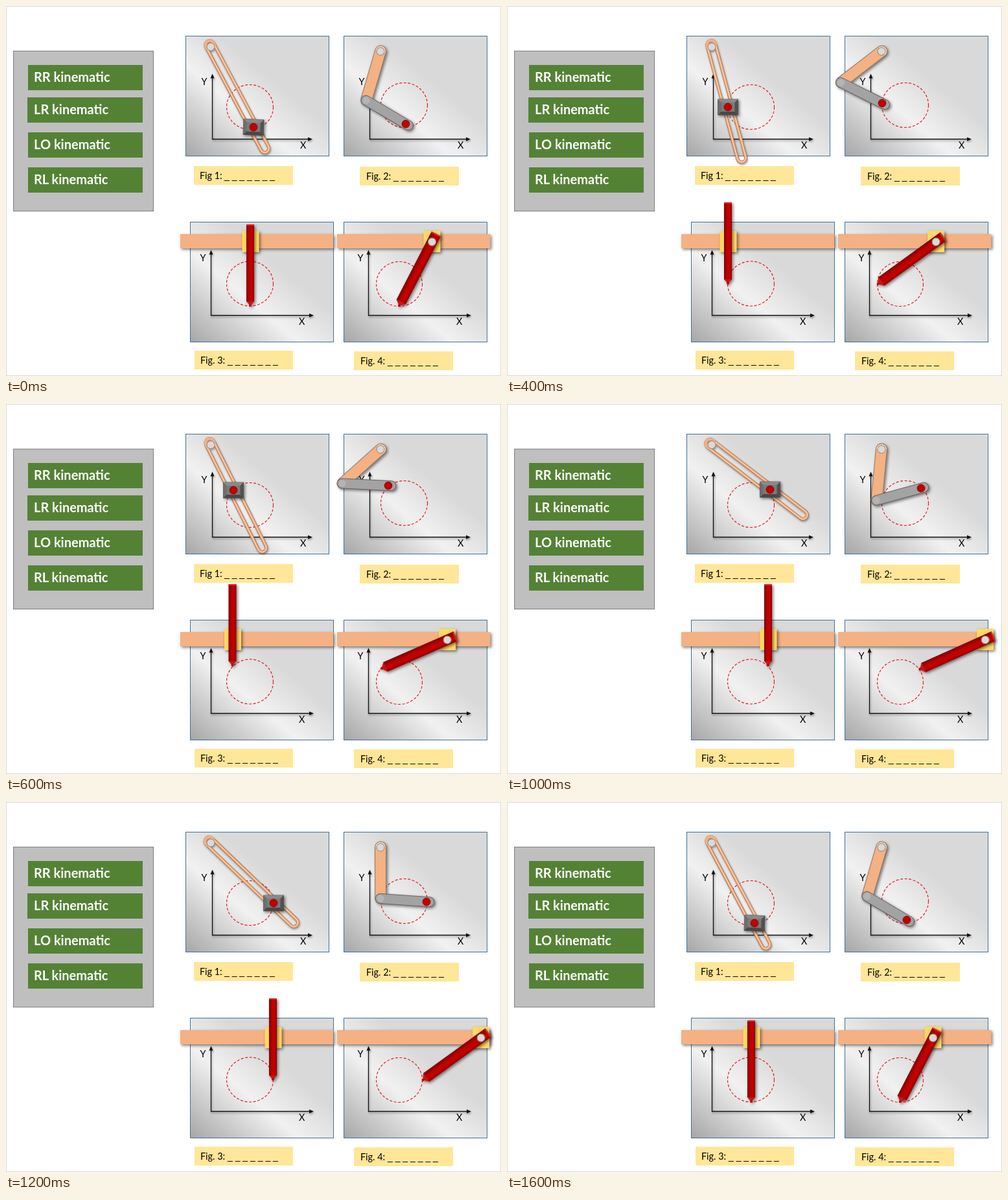
An HTML page for the animation above (1.8 s loop, 764 px wide and 571 px high).

```html
<!DOCTYPE html>
<html lang="en">
<head>
<meta charset="utf-8">
<title>Kinematics quiz</title>
<style>
  html, body { margin: 0; width: 100%; height: 100%; overflow: hidden; background: #fff; }
  svg { display: block; }
  text { font: 14.4px Lato, sans-serif; fill: #000; }
  .answer { font-weight: 700; font-size: 20px; fill: #fff; }
  .blank { font: 14px "Liberation Sans", sans-serif; }
  .axis { stroke: #111; stroke-width: 1.3; fill: none; }
  .orbit { fill: none; stroke: #e8141a; stroke-width: 1.15; stroke-dasharray: 4 2.6; }
  .soft { filter: drop-shadow(1px 2px 1.5px rgba(0, 0, 0, .35)); }
  .deep { filter: drop-shadow(2px 2px 2px rgba(0, 0, 0, .5)); }
</style>
</head>
<body>
<svg id="stage" width="764" height="571" viewBox="0 0 764 571">
  <defs>
    <linearGradient id="steel" x1="0" y1="1" x2="1" y2="0">
      <stop offset="0" stop-color="#a6a6a6"/>
      <stop offset=".38" stop-color="#f1f1f1"/>
      <stop offset=".62" stop-color="#d9d9d9"/>
    </linearGradient>
    <linearGradient id="red" x1="0" y1="0" x2="0" y2="1">
      <stop offset="0" stop-color="#8e0000"/>
      <stop offset=".3" stop-color="#c60000"/>
      <stop offset=".6" stop-color="#bd0000"/>
      <stop offset="1" stop-color="#7c0000"/>
    </linearGradient>
  </defs>
</svg>
<script>
const stage = document.getElementById('stage');

function add(parent, tag, attrs = {}, text) {
  const el = document.createElementNS('http://www.w3.org/2000/svg', tag);
  for (const k in attrs) el.setAttribute(k, attrs[k]);
  if (text) el.textContent = text;
  parent.appendChild(el);
  return el;
}
const group = (parent, cls) => add(parent, 'g', cls ? { class: cls } : {});
const rect = (parent, x, y, width, height, fill, more) =>
  add(parent, 'rect', { x, y, width, height, fill, ...more });
const disc = (parent, cx, cy, r, fill, more) =>
  add(parent, 'circle', { cx, cy, r, fill, ...more });
const shape = (parent, d, fill, more) => add(parent, 'path', { d, fill, ...more });
const label = (parent, x, y, text, cls = '') => add(parent, 'text', { x, y, class: cls }, text);

// Quiz answers
rect(stage, .5, .5, 763, 570, '#fff', { stroke: '#d9d9d9' });
rect(stage, 11.5, 69.5, 216, 247, '#bfbfbf', { stroke: '#7f7f7f' });
[['RR', 91, 34], ['LR', 141, 33], ['LO', 195, 34], ['RL', 249, 34]].forEach(([name, y, x]) => {
  rect(stage, x, y, 211 - x, 39, '#548235');
  label(stage, 43, y + 26, name + ' kinematic', 'answer');
});

// Panel with axes and the circular path
function panel(x, y, ox, oy, right, cx, cy, rx, ry) {
  rect(stage, x + .5, y + .5, 221, 185, 'url(#steel)', { stroke: '#41719c' });
  const g = group(stage, 'soft'), top = oy - 101;
  shape(g, `M${ox} ${top + 4}V${oy}H${right - 4}`, 'none', { class: 'axis' });
  shape(g, `M${ox} ${top}l3 7h-6zM${right} ${oy}l-7-3v6z`, '#111');
  label(stage, ox - 17, top + 17, 'Y');
  label(stage, ox + 135.5, oy + 14, 'X');
  add(stage, 'ellipse', { cx, cy, rx, ry, class: 'orbit' });
}

function caption(x, y, width, text, textX, blankX) {
  rect(stage, x, y, width, 29, '#ffe699');
  label(stage, textX, y + 20, text);
  label(stage, blankX, y + 20, '_ _ _ _ _ _ _', 'blank');
}

panel(277, 46, 318.5, 205.5, 473, 376.5, 156, 36, 34.5);
panel(521, 46, 561.5, 205.5, 717, 614.5, 153, 36, 34.5);
panel(284, 333, 316.5, 477.5, 475, 376.5, 428.5, 36, 34.5);
panel(521, 333, 559.5, 477.5, 718, 607, 429, 35.5, 34.5);
caption(290, 247, 153, 'Fig 1:', 299, 337);
caption(546, 248, 153, 'Fig. 2:', 556, 598);
caption(291, 532, 152, 'Fig. 3:', 300, 342);
caption(537, 533, 153, 'Fig. 4:', 547, 589);

const hole = (g, x) => disc(g, x, 0, 6, '#d9d9d9', { stroke: '#9b8a80', 'stroke-width': 1 });
const ball = g => disc(g, 0, 0, 6, '#c00000', { stroke: '#8a0000', 'stroke-width': .8 });

// Slotted arm with sliding block
const slotLayer = group(stage, 'soft');
const slot = group(slotLayer);
[['#a97048', 5], ['#f4b183', 3.4], ['#f9cfae', 1]].forEach(([stroke, w]) =>
  rect(slot, -10, -6.5, 194, 13, 'none', { rx: 6.5, stroke, 'stroke-width': w }));
shape(slot, 'M0-6.5h-3.5a6.5 6.5 0 0 0 0 13h3.5', 'none', { stroke: '#f4b183', 'stroke-width': 4.4 });
hole(slot, 0);
const block = group(group(stage, 'deep'));
rect(block, -15.5, -12, 31, 24, '#7a7a7a', { stroke: '#4a4a4a', 'stroke-width': .8 });
shape(block, 'M-15.5-12h31l-5 5h-21z', '#8a8a8a');
shape(block, 'M-15.5-12l5 5v14l-5 5z', '#6e6e6e');
shape(block, 'M15.5-12l-5 5v14l5 5z', '#515151');
shape(block, 'M-15.5 12h31l-5-5h-21z', '#484848');
ball(block);

// Two-link arm
const UPPER = 79, FORE = 71;
const linkLayer = group(stage, 'deep');
const upper = group(linkLayer);
rect(upper, -9, -8.5, UPPER + 17, 17, '#f4b183', { rx: 8.5, stroke: '#8d7a6c', 'stroke-width': 1 });
shape(upper, 'M0-7a7 7 0 0 0 0 14', 'none', { stroke: '#fbdcc4', 'stroke-width': 1.4 });
hole(upper, 0);
const fore = group(linkLayer);
rect(fore, -8, -7.5, FORE + 20, 15, '#a3a3a3', { rx: 7.5, stroke: '#666', 'stroke-width': 1 });
disc(fore, 0, 0, 5.5, '#b4b4b4');
const tool = group(stage);
ball(tool);

// Rails with carriage and pen; the pen tip is its local origin
function rail(x) {
  const g = group(stage, 'deep');
  rect(g, x, 352, 236.5, 22, '#f4b183');
  const carriage = group(group(stage, 'deep'));
  rect(carriage, -13, 347, 26, 33, '#ffd966');
  return carriage;
}
function pen(length, w) {
  const g = group(group(stage, 'deep')), h = w / 2;
  rect(g, -length, -h, length - 8, w, 'url(#red)');
  rect(g, -length, -h, 2, w, '#d42a2a');
  shape(g, `M-8.2 ${-h}L-3-1.5V1.5L-8.2 ${h}z`, '#c81414');
  disc(g, -2, 0, 2, '#c00000');
  return g;
}
const REACH = 112.5, RAIL_Y = 364;
const carriageA = rail(269), penA = pen(127, 12);
const carriageB = rail(511), penB = pen(REACH + 14, 16);
hole(penB, -REACH);

// Eight stops clockwise from the bottom of each circle
const stops = {
  slot: [[382, 187], [352, 180], [341, 156], [351, 133], [377, 121], [406, 132], [413, 156], [403, 178]],
  link: [[617, 182], [586, 172], [579, 150], [590, 126], [613, 118], [639, 130], [649, 154], [636, 177]],
  penA: [[377, 464], [353, 456], [341, 430], [349.5, 405], [377, 394], [403, 405], [412, 430], [402, 453]],
  penB: [[606, 464], [585, 457], [571, 430], [578, 409], [607, 394], [635.5, 410], [642, 430], [633, 453]]
};

function place(el, x, y, angle = 0) {
  el.setAttribute('transform', `translate(${x} ${y}) rotate(${angle * 180 / Math.PI})`);
}
const aim = (x0, y0, x1, y1) => Math.atan2(y1 - y0, x1 - x0);

function pose(i) {
  let [x, y] = stops.slot[i];
  place(slot, 316, 63, aim(316, 63, x, y));
  place(block, x, y, i ? 0 : .045);

  // Elbow by the law of cosines
  [x, y] = stops.link[i];
  const px = 578, py = 70, d = Math.hypot(x - px, y - py);
  const bend = Math.acos((UPPER ** 2 + d * d - FORE ** 2) / (2 * UPPER * d));
  const a = aim(px, py, x, y) + bend;
  const ex = px + UPPER * Math.cos(a), ey = py + UPPER * Math.sin(a);
  place(upper, px, py, a);
  place(fore, ex, ey, aim(ex, ey, x, y));
  place(tool, x, y);

  [x, y] = stops.penA[i];
  place(carriageA, x + .5, 0);
  place(penA, x, y, Math.PI / 2);

  [x, y] = stops.penB[i];
  const bx = x + Math.sqrt(REACH ** 2 - (y - RAIL_Y) ** 2);
  place(carriageB, bx, 0);
  place(penB, x, y, aim(bx, RAIL_Y, x, y));
}

const STEP = 200, LOOP = 1800;
let start, shown = -1;
function frame(now) {
  if (start === undefined) start = now;
  const i = Math.floor((now - start) % LOOP / STEP) % 8;
  if (i !== shown) pose(shown = i);
  requestAnimationFrame(frame);
}
pose(0);
requestAnimationFrame(frame);
</script>
</body>
</html>
```
